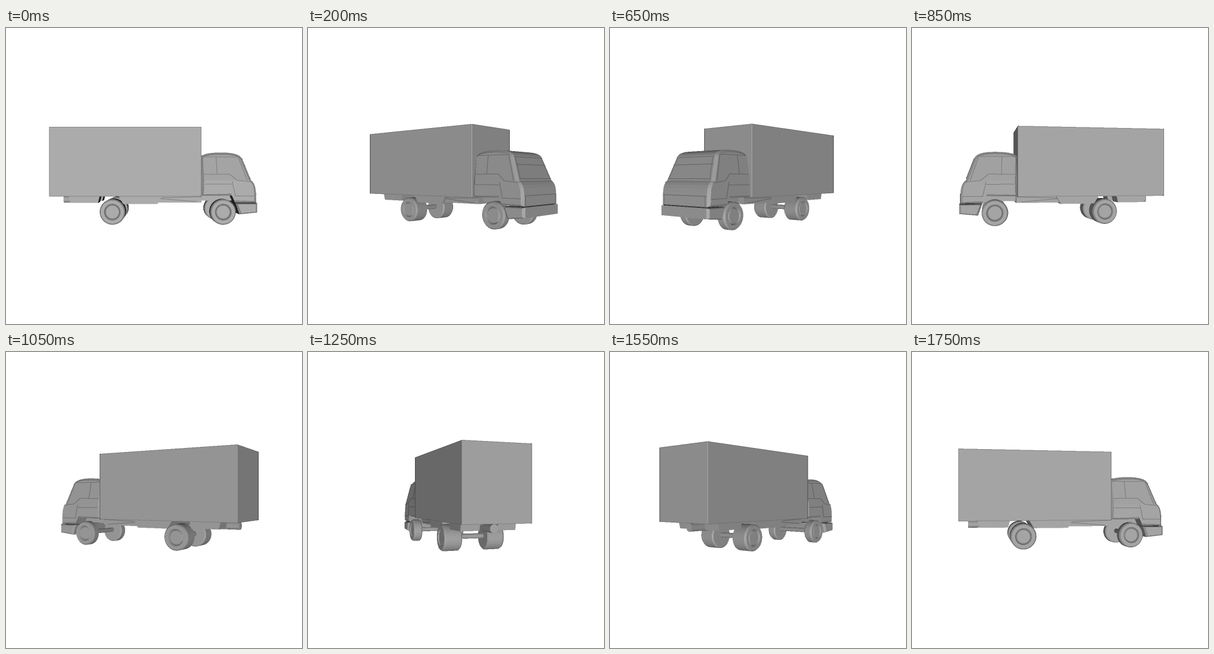
An HTML page with a canvas for the animation above (1.8 s loop, 512 by 512 pixels).

```html
<!DOCTYPE html>
<html lang="en">
<head>
<meta charset="utf-8">
<title>Truck turntable</title>
<style>
html, body { margin: 0; width: 100%; height: 100%; overflow: hidden; background: #fff; }
canvas { display: block; }
</style>
</head>
<body>
<canvas id="stage" width="512" height="512"></canvas>
<script>
const STEP = 50, LOOP = 1800;
const D = 735, CX = 255.7, CY = 257;          // camera distance, principal point
const OX = 60, OY = 140, BW = 400, BH = 220;  // drawn region
const K = 2, W = BW * K, H = BH * K;          // supersampled buffer
const SIDES = [-1, 1];

const ctx = document.getElementById('stage').getContext('2d');
const buf = document.createElement('canvas');
buf.width = W; buf.height = H;
const bctx = buf.getContext('2d');
const img = bctx.createImageData(W, H);
const pix = new Uint32Array(img.data.buffer);
const depth = new Float32Array(W * H);

// ---- model: x forward, y down, z towards the near side ----
const tris = [], lines = [];
const lerp = (a, b, t) => a.map((v, i) => v + (b[i] - v) * t);

function bend(a, c, b, n = 5) {
  return Array.from({ length: n + 1 }, (_, i) => lerp(lerp(a, c, i / n), lerp(c, b, i / n), i / n));
}
function face(...p) {
  for (let i = 2; i < p.length; i++) tris.push([p[0], p[i - 1], p[i]]);
}
function line(pts, n, k = 1) {
  for (let i = 1; i < pts.length; i++) lines.push({ a: pts[i - 1], b: pts[i], n, k });
}
// Plate between two depths; its lower edge is shorter by cut at both ends
function slab(x0, x1, y0, y1, z0, z1, cut = 0) {
  const poly = [[x0, y0], [x1, y0], [x1 - cut, y1], [x0 + cut, y1]];
  for (const z of [z0, z1]) face(...poly.map(p => [...p, z]));
  poly.forEach((p, i) => {
    const q = poly[(i + 1) % 4];
    face([...p, z0], [...q, z0], [...q, z1], [...p, z1]);
  });
}
// Symmetric body with chamfered side edges; panels split its flank
function solid(poly, wide, c, mid, panels) {
  const shrink = p => lerp(p, mid, c / Math.hypot(mid[0] - p[0], mid[1] - p[1]));
  const rim = (p, m) => [...p, m * (wide(p[1]) - c)];
  const side = (p, m) => [...shrink(p), m * wide(shrink(p)[1])];
  poly.forEach((p, i) => {
    const q = poly[(i + 1) % poly.length];
    face(rim(p, -1), rim(q, -1), rim(q, 1), rim(p, 1));
    for (const m of SIDES) face(rim(p, m), rim(q, m), side(q, m), side(p, m));
  });
  for (const m of SIDES) for (const g of panels) face(...g.map(p => side(p, m)));
}
// Surface of revolution; prof holds [radius, position along the axis]
function lathe(prof, put, n = 36) {
  for (let k = 0; k < n; k++) {
    const at = ([r, t], q) => put(r * Math.cos(q * 2 * Math.PI / n), r * Math.sin(q * 2 * Math.PI / n), t);
    for (let i = 1; i < prof.length; i++) {
      const a = prof[i - 1], b = prof[i];
      face(at(a, k), at(b, k), at(b, k + 1), at(a, k + 1));
    }
  }
}
function wheelPair(x, zIn, zOut) {
  const r = 20.8, hub = 10.4;
  const prof = [[0, zIn], [r - 2, zIn], [r, zIn + 2], [r, zOut - 3], [r - 2, zOut],
    [hub + 3, zOut], [hub + 1.5, zOut - 3], [hub, zOut - 1], [0, zOut - 1]];
  for (const m of SIDES) lathe(prof, (u, v, t) => [x + u, 57.3 + v, m * t]);
  lathe([[4, -zIn], [4, zIn]], (u, v, t) => [x + u, 56 + v, t], 16);
}

function cargo() {
  const xs = [-167.6, 76], ys = [-79.6, 31.6], Z = 52.4;
  slab(...xs, ...ys, -Z, Z);
  const at = (i, j, m) => [xs[i], ys[j], m * Z];
  for (const i of [0, 1]) for (const j of [0, 1]) {
    const dx = 2 * i - 1, dy = 2 * j - 1, m = dy;
    line([at(i, 0, m), at(i, 1, m)], [dx, 0, m]);
    line([at(0, j, dx), at(1, j, dx)], [0, dy, dx]);
    line([at(i, j, -1), at(i, j, 1)], [dx, dy, 0]);
  }
}

function cab() {
  const back = 77, belt = 6, brow = [143, -31], sill = [157, belt], chin = [165, 42];
  const wide = y => 52 - Math.max(0, belt - y) * .19;
  const top = [...bend([back, -32], [80, -39.5], [112, -39.5]),
    ...bend([112, -39.5], [138, -39], brow).slice(1), sill];
  const nose = bend(sill, [165, 11], [165, 28]).slice(1);
  const hinge = [back, belt], arch = [126, 31];
  const low = [...nose, chin, [131, 42]];
  solid([hinge, ...top, ...low, arch, [back, 31]], wide, 4, [112, belt],
    [[hinge, ...top], [arch, [back, 31], hinge, sill, ...low]]);

  const bumper = [[132, 43], [167, 43], [167, 58], [138, 61]];
  solid(bumper, () => 52.5, 3.5, [150, 51], [bumper]);

  const seams = [
    [[81, -3.5], [122, -4], [134, 6], [157, 8.5]],
    [[101, -32], [102, -4]],
    [[83, -32], [137, -32], [150, belt]],
    [[82, 12], [125, 12]],
    [[126, 8], [131, 31], [161, 31]]
  ];
  for (const m of SIDES) for (const s of seams)
    line(s.map(([x, y]) => [x, y, m * (wide(y) + .2)]), [0, 0, m], .74);

  // windscreen, bonnet and grille joints
  const tilt = [1, -.3, 0];
  const across = ([x, y], k) => line([[x + .4, y, 5 - wide(y)], [x + .4, y, wide(y) - 5]], tilt, k);
  for (const t of [.06, .36, .92]) across(lerp(brow, sill, t), .72);
  across([165, 27], .72);
  across(chin, .6);
  for (const m of SIDES) {
    const post = [.06, .92].map(t => lerp(brow, sill, t));
    line(post.map(([x, y]) => [x + .4, y, m * (wide(y) - 7)]), tilt, .78);
    line([[165.4, 27, m * 45], [165.4, 42, m * 45]], tilt, .78);
  }
}

function chassis() {
  for (const m of SIDES) {
    slab(-139, -88, 31, 43, m * 14, m * 43, 3);
    const flank = [[8, 35], [78, 33], [8, 36], [70, 41]].map(p => [...p, m * 38.2]);
    line(flank.slice(0, 2), [0, 0, m], .75);
    line(flank.slice(2), [0, 0, m], .75);
  }
  slab(-58, 14, 31, 44.5, -43, 43, 8);
  slab(8, 78, 31, 42.5, -38, 38);
  slab(78, 132, 28, 40, -26, 26);
  lathe([[0, -155], [6.2, -155], [6.2, -120]], (u, v, t) => [t, 39 + v, u], 24);
  wheelPair(-67, 21, 49.5);
  wheelPair(112, 34, 50);
}

// ---- shading: a headlight, grey by the angle between normal and view ----
function shade(x, y, z) {
  const c = z / (Math.hypot(x, y, z) || 1);
  const a = Math.acos(Math.min(1, Math.max(0, c))) * 180 / Math.PI;
  return 171 - .6 * a - .005 * a * a - 45 * (a / 90) ** 16;
}
function grey(v) {
  v = Math.round(v);
  return (0xff000000 | v << 16 | v << 8 | v) >>> 0;
}

// ---- rasteriser ----
let co = 1, si = 0;
const turn = ([x, y, z]) => [x * co - z * si, y, x * si + z * co];
function project([x, y, z]) {
  const s = D / (D - z);
  return [(CX + x * s - OX) * K, (CY + y * s - OY) * K, s];
}

function fill(t) {
  const [p, q, r] = t.map(turn);
  const ux = q[0] - p[0], uy = q[1] - p[1], uz = q[2] - p[2];
  const vx = r[0] - p[0], vy = r[1] - p[1], vz = r[2] - p[2];
  let nx = uy * vz - uz * vy, ny = uz * vx - ux * vz, nz = ux * vy - uy * vx;
  if (nz * (D - p[2]) - nx * p[0] - ny * p[1] < 0) { nx = -nx; ny = -ny; nz = -nz; }
  const [a, b, c] = [p, q, r].map(project);
  const area = (b[0] - a[0]) * (c[1] - a[1]) - (b[1] - a[1]) * (c[0] - a[0]);
  if (Math.abs(area) < 1e-6) return;
  const col = grey(shade(nx, ny, nz));
  const x0 = Math.max(0, Math.floor(Math.min(a[0], b[0], c[0])));
  const x1 = Math.min(W - 1, Math.ceil(Math.max(a[0], b[0], c[0])));
  const y0 = Math.max(0, Math.floor(Math.min(a[1], b[1], c[1])));
  const y1 = Math.min(H - 1, Math.ceil(Math.max(a[1], b[1], c[1])));
  const db = (c[1] - a[1]) / area, dc = -(b[1] - a[1]) / area;
  for (let y = y0; y <= y1; y++) {
    const px = x0 + .5 - a[0], py = y + .5 - a[1];
    let wb = (px * (c[1] - a[1]) - py * (c[0] - a[0])) / area;
    let wc = (py * (b[0] - a[0]) - px * (b[1] - a[1])) / area;
    for (let x = x0, i = y * W + x0; x <= x1; x++, i++, wb += db, wc += dc) {
      if (wb < 0 || wc < 0 || wb + wc > 1) continue;
      const s = a[2] + wb * (b[2] - a[2]) + wc * (c[2] - a[2]);
      if (s > depth[i]) { depth[i] = s; pix[i] = col; }
    }
  }
}

function stroke({ a, b, n, k }) {
  const p = project(turn(a)), q = project(turn(b));
  const col = grey(Math.max(75, shade(...turn(n)) * k));
  const len = Math.ceil(Math.max(Math.abs(q[0] - p[0]), Math.abs(q[1] - p[1]), 1));
  for (let j = 0; j <= len; j++) {
    const [px, py, ps] = lerp(p, q, j / len);
    const x = Math.round(px) - 1, y = Math.round(py) - 1;
    for (let d = 0; d < 4; d++) {
      const u = x + (d & 1), v = y + (d >> 1);
      if (u < 0 || v < 0 || u >= W || v >= H) continue;
      const i = v * W + u;
      if (ps * 1.002 > depth[i]) pix[i] = col;
    }
  }
}

function draw(angle) {
  co = Math.cos(angle); si = Math.sin(angle);
  pix.fill(0xffffffff);
  depth.fill(0);
  tris.forEach(fill);
  lines.forEach(stroke);
  bctx.putImageData(img, 0, 0);
  ctx.fillStyle = '#fff';
  ctx.fillRect(0, 0, 512, 512);
  ctx.drawImage(buf, OX, OY, BW, BH);
}

cargo();
cab();
chassis();
const start = performance.now();
let shown = -1;
function tick() {
  const t = Math.max(0, performance.now() - start) % LOOP;
  const pose = Math.floor(t / STEP);
  if (pose !== shown) {
    shown = pose;
    draw(pose * STEP / LOOP * 2 * Math.PI);
  }
  requestAnimationFrame(tick);
}
tick();
</script>
</body>
</html>
```
